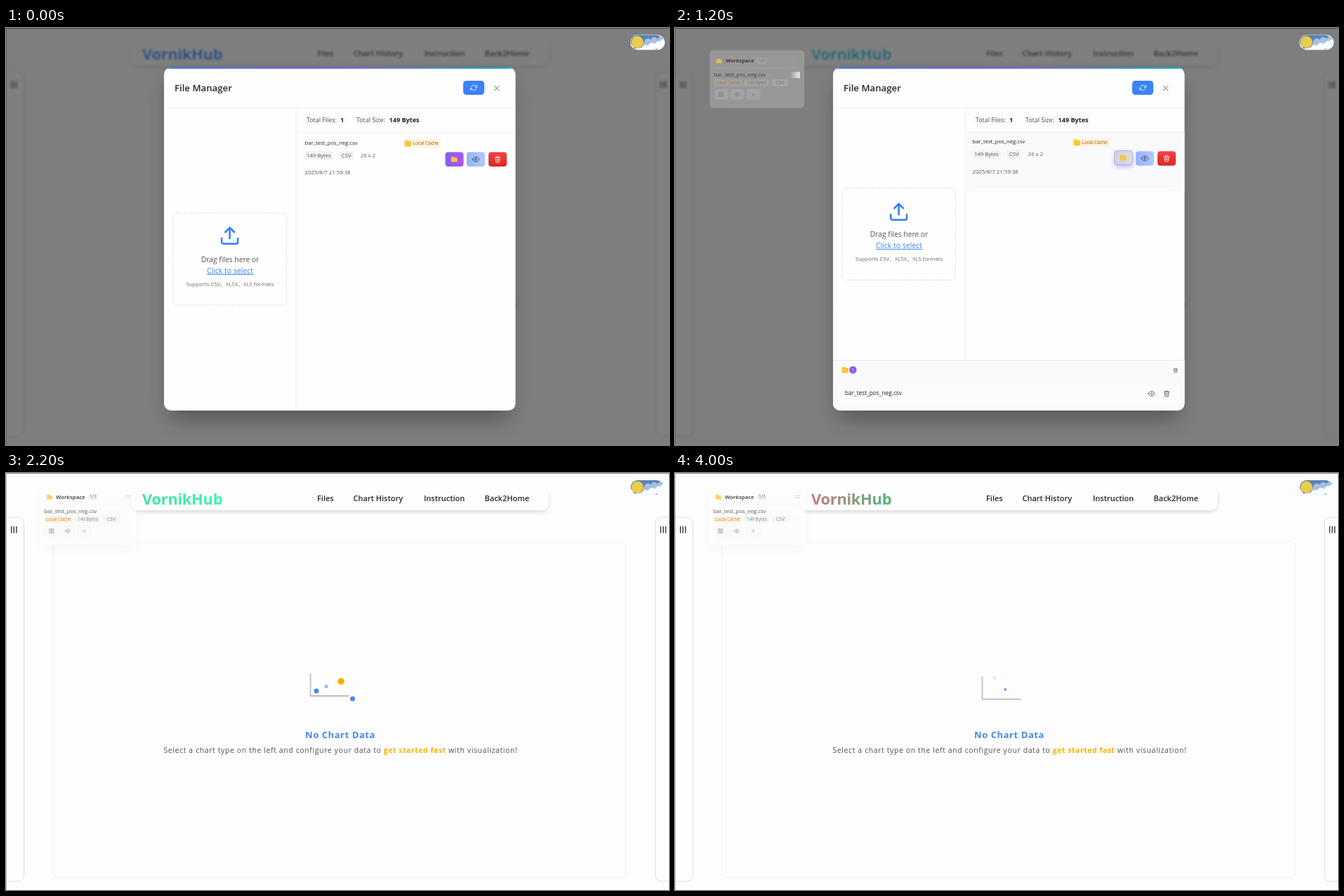
These frames come from a looping animation (944 px wide and 593 px high, 4.1 s). An HTML page:

```html
<!DOCTYPE html>
<html lang="en">
<head>
<meta charset="utf-8">
<title>File manager</title>
<style>
  html, body { margin: 0; width: 100%; height: 100%; overflow: hidden; background: #fdfdfd; }
  svg { display: block; width: 100vw; height: 100vh; }
  text { font-family: "Open Sans", "Noto Sans CJK SC", "Noto Sans CJK", "Noto Sans", sans-serif; white-space: pre; }
</style>
</head>
<body>
<svg id="stage" viewBox="0 0 944 593"></svg>
<script>
const LOOP = 4100, STEP = 100;
const OPEN_PANEL = 1100, SHOW_CARD = 1200, CLOSE = 2200;

// Static drawing helpers
const rect = (x, y, w, h, r, fill, more = '') =>
  `<rect x="${x}" y="${y}" width="${w}" height="${h}" rx="${r}" fill="${fill}" ${more}/>`;
const circle = (x, y, r, fill, more = '') => `<circle cx="${x}" cy="${y}" r="${r}" fill="${fill}" ${more}/>`;
const line = (d, color, w = 1) => `<path d="${d}" fill="none" stroke="${color}" stroke-width="${w}"/>`;
const text = (x, y, size, str, fill = '#333', more = '') =>
  `<text x="${x}" y="${y}" font-size="${size}" fill="${fill}" ${more}>${str}</text>`;
const group = (id, body, more = '') => `<g id="${id}" ${more}>${body}</g>`;
const bold = 'font-weight="600"', heavy = 'font-weight="700"', mid = 'text-anchor="middle"';

const ICONS = {
  eye: 'M1 12s4-8 11-8 11 8 11 8-4 8-11 8-11-8-11-8zM9 12a3 3 0 1 0 6 0a3 3 0 1 0-6 0',
  trash: 'M3 6h18M8 6V4a2 2 0 0 1 2-2h4a2 2 0 0 1 2 2v2M19 6l-1 14a2 2 0 0 1-2 2H8a2 2 0 0 1-2-2L5 6M10 11v6M14 11v6',
  refresh: 'M23 4v6h-6M1 20v-6h6M3.5 9a9 9 0 0 1 14.9-3.4L23 10M1 14l4.6 4.4A9 9 0 0 0 20.5 15',
  upload: 'M21 15v4a2 2 0 0 1-2 2H5a2 2 0 0 1-2-2v-4M17 8l-5-5-5 5M12 3v12',
  cross: 'M4 4l16 16M20 4L4 20',
  grid: 'M4 4h6v6H4zM14 4h6v6h-6zM4 14h6v6H4zM14 14h6v6h-6z'
};
const icon = (name, x, y, size, color, w = 2) =>
  `<path d="${ICONS[name]}" transform="translate(${x - size / 2} ${y - size / 2}) scale(${size / 24})"
    fill="none" stroke="${color}" stroke-width="${w}" stroke-linecap="round" stroke-linejoin="round"/>`;
const folder = (x, y, w, h) =>
  `<path d="M${x} ${y + 1}q0-1 1-1h${w * .3}l1 1.2h${w * .7 - 3}q1 0 1 1v${h - 3.2}q0 1-1 1h${2 - w}q-1 0-1-1z" fill="#fbc53a"/>`;
const gradient = (id, stops, more = '') => `<linearGradient id="${id}" ${more}>` +
  stops.map((c, i) => `<stop offset="${i / (stops.length - 1)}" stop-color="${c}"/>`).join('') + '</linearGradient>';
const blur = (id, s, box) => `<filter id="${id}" filterUnits="userSpaceOnUse" ${box}><feGaussianBlur stdDeviation="${s}"/></filter>`;

const full = 'x="-60" y="-60" width="1064" height="713"';
const defs = `<defs>
  ${blur('soft', 1.5, full)}${blur('near', 3, full)}${blur('wide', 8, full)}${blur('far', 15, full)}
  ${gradient('strip', ['#3b82f6', '#8b5cf6', '#06b6d4'])}
  ${gradient('violet', ['#8b5cf6', '#a855f7'])}
  ${gradient('peri', ['#93b4fb', '#b9c6fb'])}
  ${gradient('red', ['#ef4444', '#dc2626'], 'x2="0" y2="1"')}
  ${gradient('grey', ['#cfd3da', '#d9dce1'])}
  ${gradient('sky', ['#527db3', '#7ba1d2'], 'x2="0" y2="1"')}
  <linearGradient id="fade"><stop stop-color="#fff" stop-opacity=".1"/><stop offset="1" stop-color="#fff" stop-opacity=".8"/></linearGradient>
  <linearGradient id="brand" gradientUnits="userSpaceOnUse" x1="194" x2="307" y1="0" y2="0">
    <stop id="brandL"/><stop id="brandR" offset="1"/></linearGradient>
  <clipPath id="modalClip">${rect(225, 56, 500.5, 488, 10, '#000')}</clipPath>
  <clipPath id="pill">${rect(889.5, 10.3, 48, 20.4, 10.2, '#000')}</clipPath>
</defs>`;

const bars = x => [0, 3.6, 7.2].map(d => rect(x + d, 75.5, 1.4, 10, .6, '#333')).join('');
const sidePanel = x => rect(x, 63, 36, 517.5, 8, '#fefefe', 'stroke="#dedede"');
const page = group('page', `
  ${rect(67, 97, 816.5, 478.5, 8, '#fdfdfd', 'stroke="#f3f3f3"')}
  ${sidePanel(-10.5)}${sidePanel(924.5)}${bars(7)}${bars(931.5)}
  ${rect(179, 24, 593, 30.5, 9, '#000', 'opacity=".18" filter="url(#near)"')}
  ${rect(178, 18, 594.5, 35, 9, '#fefefe')}
  ${text(194, 45, 21.9, 'VornikHub', 'url(#brand)', heavy + ' letter-spacing="-.3"')}
  ${[[443, 'Files'], [494.5, 'Chart History'], [595, 'Instruction'], [681.5, 'Back2Home']]
    .map(([x, s]) => text(x, 40.4, 11, s, '#262626', bold)).join('')}
  ${group('axes', line('M1 0V32H56', '#bdbdbd', 1.8))}
  ${['#4488f5', '#94c0f8', '#ffae00', '#4488f5'].map((c, i) => circle(0, 0, 0, c, `id="dot${i}"`)).join('')}
  ${text(426, 377.3, 13, 'No Chart Data', '#4488f0', heavy + ' letter-spacing=".57"')}
  ${text(224.5, 398.2, 10.4, `Select a chart type on the left and configure your data to <tspan fill="#ffae00" letter-spacing=".57" ${heavy}>get started fast</tspan> with visualization!`, '#505050', 'letter-spacing=".65"')}
`);

const FILE = 'bar_test_pos_neg.csv';
const button = (x, fill, body) => rect(x, 176.5, 26, 20.5, 4, fill) + body;

const upload = group('upload', `
  ${rect(238, 263, 161.5, 131, 6, '#fefefe', 'stroke="#d9dce1" stroke-dasharray="3 1.5"')}
  ${group('arrow', icon('upload', 318.6, 296.3, 30.5, '#3b82f6', 2.1))}
  ${text(319, 333, 10.3, 'Drag files here or', '#555', mid)}
  ${text(319, 348.8, 10.5, 'Click to select', '#3b82f6', mid + ' text-decoration="underline"')}
  ${text(319, 367, 7.75, 'Supports CSV、XLSX、XLS formats', '#6a6a6a', mid)}
`);

const row = `
  ${group('rowBg', rect(413.5, 149, 312, 83.5, 0, '#f8fafc') + line('M425 224.5H713', '#f3f5f8'))}
  ${group('rowText', `
    ${text(425.5, 165.7, 7.65, FILE, '#222')}
    ${rect(425.5, 175, 40, 12, 2, '#f1f2f4')}${text(428, 183.8, 7.7, '149 Bytes', '#555')}
    ${rect(475, 175, 20, 12, 2, '#f1f2f4')}${text(477.8, 183.8, 7.8, 'CSV', '#555')}
    ${text(504.8, 183.8, 7.6, '26 x 2', '#555')}
    ${text(425.5, 207.9, 7.75, '2025/8/7 21:59:38', '#555')}`)}
  ${group('rowSide', `
    ${rect(565, 158, 53.5, 12, 2.5, '#fff3dc')}${folder(568, 159.8, 9, 8.5)}
    ${text(579.5, 166.4, 6.6, 'Local Cache', '#a5520c')}
    ${group('folderBtn', `
      ${group('glow', rect(626, 180, 26, 20, 5, '#8b5cf6', 'opacity=".4" filter="url(#near)"'))}
      ${rect(625.5, 176.5, 26, 20.5, 4, 'url(#violet)', 'id="folderFace"')}${folder(633.8, 183, 8.8, 7.5)}`)}
    ${button(656, 'url(#peri)', icon('eye', 669, 186.8, 10.5, '#2f3a55'))}
    ${button(687, 'url(#red)', icon('trash', 700, 186.8, 10, '#fff'))}`)}
`;

const dock = group('dock', `
  ${rect(225, 472.5, 501, 72, 0, '#f8fafc')}${line('M225 472.5H726', '#e8ebef')}
  ${folder(237.5, 482, 9.5, 8.5)}${circle(253.3, 486.2, 5.2, '#8b5cf6')}
  ${text(253.3, 488.4, 6, '1', '#fff', mid)}${icon('trash', 712.7, 487, 7.5, '#555')}
  ${rect(233, 503.5, 485, 32, 4, '#fafbfd')}
  ${text(242, 522.3, 8.25, FILE, '#222')}
  ${icon('eye', 678.6, 520, 10.5, '#555')}${icon('trash', 700, 520, 10, '#555')}
`);

const modal = group('modal', `
  ${rect(0, 0, 944, 593, 0, '#000', 'opacity=".5"')}
  ${rect(232, 74, 486, 482, 12, '#000', 'opacity=".32" filter="url(#far)"')}
  <g clip-path="url(#modalClip)">
    ${rect(225, 56, 501, 488, 0, '#fefefe')}${rect(225, 56, 501, 2, 0, 'url(#strip)')}
    ${text(240, 89.6, 13.2, 'File Manager', '#262626', bold)}
    ${rect(651, 75, 30, 20, 4.5, '#3b82f6')}${icon('refresh', 666, 85, 10, '#fff')}
    ${icon('cross', 698.7, 85.6, 10, '#444')}
    ${group('closeHot', rect(686, 70, 26, 30, 6, '#fee4e4') + icon('cross', 698.7, 85.6, 11, '#ef4444', 2.3))}
    ${line('M225 113.5H726M413.5 148.5H726M413 113V544', '#eceef0')}
    ${rect(425, 123.5, 60, 14.5, 3, '#f9fafb')}${rect(496, 123.5, 95, 14.5, 3, '#f9fafb')}
    ${text(428, 134, 8.85, 'Total Files:', '#555')}${text(476, 134, 9.1, '1', '#222', heavy)}
    ${text(499, 134, 8.85, 'Total Size:', '#555')}${text(545.5, 134, 9.1, '149 Bytes', '#222', heavy)}
    ${row}${upload}${dock}
  </g>
`);

const smallBtn = x => rect(x, 75, 20, 15, 3, '#fafafa', 'stroke="#f0f0f0" stroke-width=".7"');
const card = group('card', `
  ${group('cardShade', rect(48, 24, 138, 84, 6, '#000', 'filter="url(#wide)"'))}
  ${rect(48, 18.3, 137.5, 84, 5, '#fff', 'id="cardFace"')}
  ${group('chips', `
    ${rect(117, 28.7, 14, 10.3, 3, '#ebeffa')}${rect(55, 60.7, 40, 10, 2, '#fff0d2')}
    ${rect(98, 60.7, 36, 10, 2, '#f2f3f4')}${rect(138, 60.7, 24, 10, 2, '#f2f3f4')}
    ${[55, 78, 101.5].map(smallBtn).join('')}${line('M55 44.5H178', '#f5f5f5')}`)}
  ${rect(166, 50, 13, 9, 0, 'url(#fade)')}
  ${group('cardText', `
    ${folder(58, 30.8, 8, 6.6)}${text(71, 36.5, 7.6, 'Workspace', '#222', heavy)}
    ${text(119, 36.3, 6.6, '1/1', '#3f4a66')}
    ${[0, 1, 2].map(i => circle(171 + i * 2.7, 32.4, .6, '#999') + circle(171 + i * 2.7, 35.2, .6, '#999')).join('')}
    ${text(54.5, 56.8, 7.65, FILE, '#222')}
    ${text(57, 68, 6.45, 'Local Cache', '#a86110')}${text(102, 68, 6.4, '149 Bytes', '#666')}${text(144, 68, 6.7, 'CSV', '#666')}
    ${icon('grid', 65, 82.6, 9, '#666', 1.7)}${icon('eye', 88, 82.6, 8, '#666')}${icon('cross', 111.5, 82.6, 5.5, '#666', 2.6)}`)}
`);

const puffs = (fill, list) => list.map(([x, y, r]) => circle(x, y, r, fill)).join('');
const toggle = `
  ${rect(889, 9.8, 49, 21.4, 10.7, '#fdfdfd')}
  <g clip-path="url(#pill)">
    ${rect(889, 10, 45, 21, 8, 'url(#sky)')}
    ${puffs('#a9c1de', [[932, 17, 4.5], [923, 18, 5], [914, 20, 5], [907, 25, 5]])}
    ${puffs('#fafcff', [[937, 21, 5.5], [930, 24.5, 6], [920, 27, 6], [911, 29.5, 5.5], [901, 33, 6], [889, 28, 5]])}
  </g>
  ${circle(899.3, 20.3, 9, '#a98f33', 'opacity=".5"')}${circle(899, 20, 8.3, '#ebcb4b')}`;

document.getElementById('stage').innerHTML = defs + rect(0, 0, 944, 593, 0, '#fdfdfd') + page +
  line('M0 .5H944', '#8c8c8c') + line('M.5 0V593', '#c4c4c4') + modal + card + toggle;

// Motion
const el = {};
document.querySelectorAll('#stage [id]').forEach(n => el[n.id] = n);
const set = (id, name, v) => el[id].setAttribute(name, v);
const move = (id, x, y) => set(id, 'transform', `translate(${x} ${y})`);
const show = (id, on) => set(id, 'display', on ? 'inline' : 'none');
const ramp = (t, a, b) => { const p = Math.min(1, Math.max(0, (t - a) / (b - a))); return p * p * (3 - 2 * p); };
const pulse = (t, a, b, c, d) => ramp(t, a, b) - ramp(t, c, d);

// Linear blend between rows of [time, ...values]
function blend(t, keys) {
  let i = 1;
  while (i < keys.length - 1 && t > keys[i][0]) i++;
  const [a, b] = [keys[i - 1], keys[i]];
  const p = Math.min(1, Math.max(0, (t - a[0]) / (b[0] - a[0])));
  return a.slice(1).map((v, k) => v + (b[k + 1] - v) * p);
}

const BRAND_L = [[0, 45, 155, 250], [500, 30, 175, 245], [1200, 20, 218, 232], [2200, 66, 229, 160], [2900, 124, 191, 141], [4000, 200, 120, 127]];
const BRAND_R = [[0, 40, 160, 255], [500, 25, 180, 250], [1200, 20, 212, 236], [2200, 63, 242, 176], [2900, 75, 242, 155], [4000, 76, 186, 120]];
const AXES = [[2200, 432.5, 285], [2500, 435.5, 286.5], [2900, 437.5, 288], [3500, 436, 291], [4000, 436.5, 289.6]];
const DOTS = [
  [[2200, 442, 310, 3.4, 1], [2900, 446, 311, 3.2, 1], [3900, 452, 312, 1.2, 0]],
  [[2200, 456, 303.5, 2.6, 1], [2900, 457.5, 303, 2.3, 1], [3900, 460, 302, 1, 0]],
  [[2200, 477, 296.3, 4.8, 1], [2900, 473, 295.5, 4, 1], [4000, 455, 291.2, 2.2, .35]],
  [[2200, 493.5, 321, 3.5, 1], [2900, 485, 315, 2.8, 1], [4000, 470.2, 307.8, 1.9, .85]]
];

function draw(t) {
  const open = t < CLOSE, docked = t >= OPEN_PANEL;
  set('brandL', 'stop-color', `rgb(${blend(t, BRAND_L)})`);
  set('brandR', 'stop-color', `rgb(${blend(t, BRAND_R)})`);
  set('page', 'filter', open ? 'url(#soft)' : 'none');
  show('modal', open);

  const hover = pulse(t, 200, 400, 1500, 1700), lift = pulse(t, 700, 900, 1500, 1700);
  set('rowBg', 'opacity', hover);
  move('rowText', -2 * hover, -1.3 * hover);
  move('rowSide', 0, -1.3 * hover);
  move('folderBtn', 0, -lift);
  set('glow', 'opacity', lift);
  set('folderFace', 'fill', docked ? 'url(#grey)' : 'url(#violet)');
  set('folderFace', 'stroke', docked && lift > .1 ? '#b9a5f5' : 'none');
  set('closeHot', 'opacity', ramp(t, 1850, 2000));
  show('dock', docked);
  move('upload', 0, docked ? -35.6 : 0);
  move('arrow', 0, -1.1 * (1 + Math.cos(2 * Math.PI * (t - 150) / 3000)) + 1.2);

  const over = pulse(t, 2500, 2800, 3400, 3700), rise = 1 - ramp(t, SHOW_CARD, SHOW_CARD + 300);
  show('card', t >= SHOW_CARD);
  set('card', 'transform', `translate(116.75 ${60.3 + 12.3 * rise - .8 * over}) scale(${1 - .02 * rise}) translate(-116.75 -60.3)`);
  set('cardFace', 'fill-opacity', open ? .2 : .7 + .3 * over);
  set('cardShade', 'opacity', open ? 0 : .025 + .13 * over);
  set('chips', 'opacity', open ? .12 : .7 + .3 * over);
  set('cardText', 'opacity', .75 + .25 * over);

  move('axes', ...blend(t, AXES));
  DOTS.forEach((keys, i) => {
    const [x, y, r, a] = blend(t, keys);
    Object.entries({ cx: x, cy: y, r, opacity: a }).forEach(([k, v]) => set('dot' + i, k, v));
  });
}

const start = performance.now();
function tick() {
  const t = (performance.now() - start) % LOOP;
  draw(Math.floor(t / STEP) * STEP);
  requestAnimationFrame(tick);
}
tick();
</script>
</body>
</html>
```
